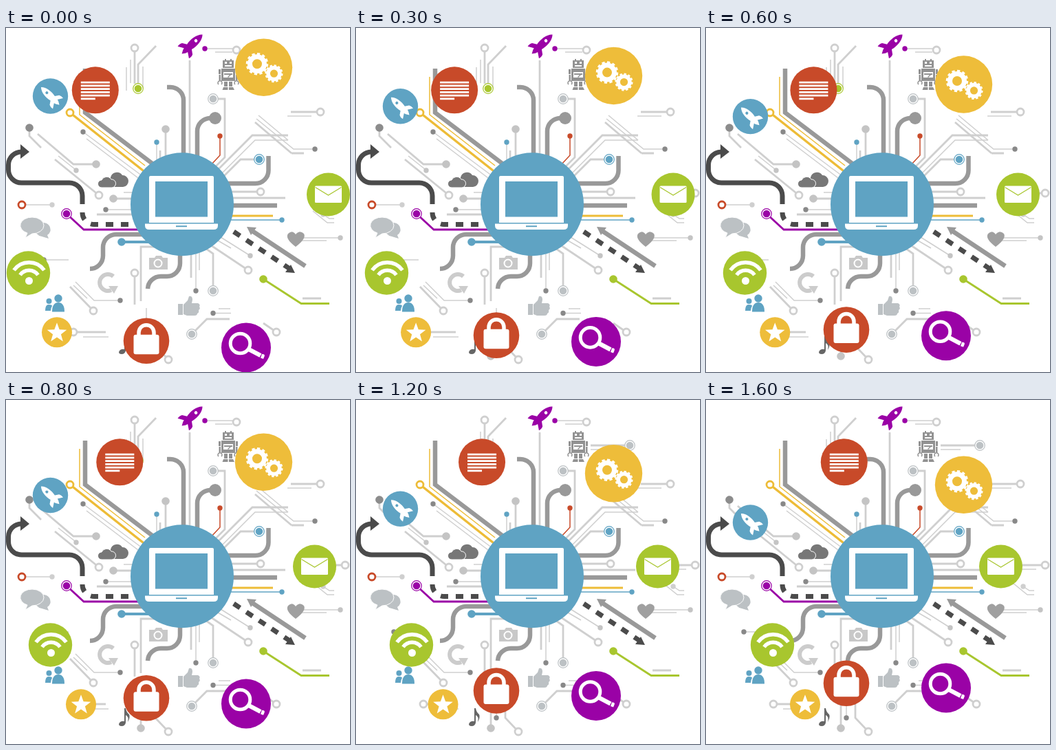
These frames come from a looping animation (500x500 px, 1700 ms). An HTML page:

```html
<!DOCTYPE html>
<html lang="en">
<head>
<meta charset="utf-8">
<title>Connected devices</title>
<style>
  html, body { margin: 0; width: 100%; height: 100%; overflow: hidden; background: #fff; }
  svg { display: block; width: 100vw; height: 100vh; }
  .line { fill: none; stroke: #fff; }
</style>
</head>
<body>
<svg viewBox="0 0 500 500">
  <defs>
    <path id="rocket" d="M0-24C6-18 7-7 5 2L11 6Q13 9 12 14L4 9 3 12 0 17-3 12-4 9-12 14Q-13 9-11 6L-5 2C-7-7-6-18 0-24Z"/>
    <g id="gear" class="line">
      <circle r="10.500" stroke-width="7"/>
      <circle r="14.500" stroke-width="3.500" pathLength="24" stroke-dasharray="1.100 .9"/>
    </g>
  </defs>

  <g id="wires" fill="none"></g>
  <g id="nodes"></g>
  <path d="M21 169L34 180L21 190ZM420 356L406 355L414 344Z" fill="#4b4b4b"/>
  <path d="M350 289L364 290L356 301Z" fill="#999"/>

  <!-- fixed icons -->
  <g transform="translate(268 26) rotate(47)">
    <use href="#rocket" fill="#9a02a6"/><circle cy="-11" r="2.300" fill="#fff"/>
  </g>
  <g fill="#929292">
    <path d="M315 47H318V45H320V47H326V45H328V47H331V58H315ZM313 59H333V77H313ZM309 60H312V67H309ZM334 60H337V67H334ZM309.500 68H312V76H309.500ZM334 68H336.500V76H334ZM317 78H322V85H317ZM324 78H329V85H324ZM316 86H322.500V90H314.500ZM324 86H330L332 90H324Z"/>
    <path d="M309 82A3 3 0 1 1 313 82M333 82A3 3 0 1 1 337 82" fill="none" stroke="#929292" stroke-width="1.500"/>
    <path d="M318 49H321V52H318ZM325 49H328V52H325ZM318 54H328V56H318ZM316 64H330V72H316Z" fill="#fff"/>
    <path d="M317 66H329V68H317ZM322 71L327 66L328 67L323 72Z"/>
  </g>
  <g fill="#777">
    <path d="M152 231V217A9.500 9.500 0 0 1 169 214A8.500 8.500 0 0 1 170 231Z"/>
    <path d="M139 232A5 5 0 0 1 139 221A8 8 0 0 1 153 220A6 6 0 0 1 154 232Z" stroke="#fff"/>
  </g>
  <g fill="#bcc1c4">
    <path d="M55 283A11 10 0 0 1 60 301L62 306L52 303A11 10 0 0 1 55 283Z"/>
    <path d="M38 275A17 12 0 1 1 38 299L28 305L31 298A17 12 0 0 1 38 275Z" stroke="#fff"/>
    <path d="M250 401H257V417H250ZM258 402L264 396L266 390Q271 389 271 395L270 400H279Q283 402 281 405Q283 408 280 410Q281 414 278 415Q278 418 274 418H263L258 416Z"/>
  </g>
  <path d="M156 361A12 12 0 1 0 153 381" fill="none" stroke="#ccc" stroke-width="6"/>
  <path d="M149 375H163L157 386Z" fill="#ccc"/>
  <path d="M208 334H216L218 331H226L228 334H235V351H208Z" fill="#c8c8c8"/>
  <circle cx="221" cy="342" r="5.500" class="line" stroke-width="2"/>
  <path d="M421 318Q405 306 410 299Q416 293 421 300Q427 293 433 299Q437 306 421 318Z" fill="#a0a0a0"/>
  <path d="M172 448H174Q175 454 179 457Q181 461 177 468Q179 460 174 458V469Q173 474 168 474Q164 474 164 471Q166 466 172 467Z" fill="#666"/>

  <!-- sliding badges: start position and total travel -->
  <g data-x="129.8" data-y="90.3" data-dx="71"><circle r="34" fill="#c84a29"/>
    <path id="text" class="line" stroke-width="2.600"/></g>
  <g data-x="64.5" data-y="99" data-dy="79"><circle r="25.700" fill="#5fa3c3"/>
    <g transform="translate(2 2) rotate(-46) scale(.9)">
      <use href="#rocket" fill="#fff"/><circle cy="-11" r="2.300" fill="#5fa3c3"/>
    </g></g>
  <g data-x="374.5" data-y="57.2" data-dy="66"><circle r="41.700" fill="#eebd3a"/>
    <use href="#gear" x="-9.500" y="-5"/>
    <use href="#gear" transform="translate(15 9) scale(.8)"/></g>
  <g data-x="468.5" data-y="242" data-dx="-40"><circle r="31.500" fill="#a8c62e"/>
    <rect x="-19.500" y="-12.500" width="39" height="24.500" rx="1.500" fill="#fff"/>
    <path d="M-19-10.500L0 1L19-10.500" fill="none" stroke="#a8c62e" stroke-width="1.200"/></g>
  <g data-x="32.5" data-y="356" data-dx="64"><circle r="31.700" fill="#a8c62e"/>
    <path class="line" stroke-width="5.500" d="M-21-4A27 27 0 0 1 23-4M-12 3A16 16 0 0 1 14 3"/>
    <circle cx="1" cy="11.500" r="5.500" fill="#fff"/></g>
  <g data-x="74" data-y="442.3" data-dx="70"><circle r="22" fill="#eebd3a"/>
    <path id="star" fill="#fff"/></g>
  <g data-x="204" data-y="454.7" data-dy="-43"><circle r="33.300" fill="#c84a29"/>
    <rect x="-18.500" y="-9" width="37" height="28.500" rx="3" fill="#fff"/>
    <path class="line" stroke-width="5.500" d="M-11-8V-12A11 11 0 0 1 11-12V-8"/></g>
  <g data-x="349" data-y="464.5" data-dy="-46"><circle r="36" fill="#9a02a6"/>
    <circle class="line" cx="-8.500" cy="-6" r="14.300" stroke-width="5"/>
    <path class="line" stroke-width="6.500" d="M3 2L21 11.500"/>
    <path d="M23 9.500Q28 9 26.500 13L25 16.500L21 15Z" fill="#fff"/></g>

  <!-- people, hub and laptop -->
  <g fill="#5fa3c3">
    <circle cx="62.500" cy="397" r="4"/><path d="M57 411Q57 402 62 402Q67 402 67 404Q65 407 65 411Z"/>
    <circle cx="76" cy="393" r="5.700"/><path d="M67 412.500Q67 399 76 399Q85 399 85 412.500Z"/>
    <circle cx="256" cy="256.300" r="75"/>
  </g>
  <g fill="#fff">
    <path fill-rule="evenodd" d="M210 215H300Q302 215 302 217V283H208V217Q208 215 210 215ZM217 223V274.500H293V223Z"/>
    <path d="M202 284.500H308V287Q308 293 302 293H208Q202 293 202 287Z"/>
    <path d="M247 287.200H263V289.200H247Z" fill="#5fa3c3"/>
  </g>
</svg>
<script>
const $ = id => document.getElementById(id);
const LIGHT = "#cfcfcf", SILVER = "#bcc1c4", GREY = "#999", DARK = "#4b4b4b", BLUE = "#5fa3c3",
      RED = "#c84a29", YELLOW = "#edbc37", GREEN = "#a8c62e", PURPLE = "#9a02a6";

function add(parent, tag, attrs) {
  const el = document.createElementNS("http://www.w3.org/2000/svg", tag);
  for (const name in attrs) el.setAttribute(name, attrs[name]);
  $(parent).append(el);
}

const circle = (cx, cy, r, fill, stroke = "none", width = 0) =>
  add("nodes", "circle", { cx, cy, r, fill, stroke, "stroke-width": width });
const node = {
  ring: (x, y, color) => circle(x, y, 5, "#fff", color, 2.8),
  dot: (x, y, color) => circle(x, y, 3.7, color),
  disc: (x, y, color) => circle(x, y, 5.8, color),
  knob: (x, y, color) => circle(x, y, 9, color),
  target(x, y, color) {
    circle(x, y, 7.3, "#fff", color, 1.2);
    circle(x, y, 5.3, color);
  },
};

// A wire may carry a node at its first point; wires run on beneath the hub.
function wire(d, width, color = LIGHT, kind, nodeColor = color, dash = "none") {
  add("wires", "path", { d, stroke: color, "stroke-width": width, "stroke-dasharray": dash });
  if (kind) node[kind](...d.match(/[\d.]+/g).slice(0, 2), nodeColor);
}
const thin = (d, kind, color = "#888") => wire(d, 1.5, LIGHT, kind, color);
const wide = (d, kind, color = LIGHT) => wire(d, 2.8, LIGHT, kind, color);
const pipe = (d, kind) => wire(d, 6.5, GREY, kind);

// Thin companions
thin("M181 46V80M175 57V91M199 56V88M76 186L100 205M117 161L192 218M171 239H256");
thin("M304 35H329M341 72H370M409 128H444M459 246H480M430 309H466M112 449H149M309 408H326");
thin("M410 163H362L312 213M367 127L410 163M446 266L467 283H477");
thin("M281 256V352M308 309L327 320M98 374L118 393");

// Thin wires
thin("M112 151L198 215", "dot");
thin("M145 264H256", "dot");
thin("M449 176H418L364 132", "dot");
thin("M355 331L312 304", "dot", "#c4c4c4");
thin("M276 382V256", "dot");
thin("M301 414.500H327", "dot");
thin("M166 396H128L101 369", "dot");
thin("M55 337H91", "dot");
thin("M204 462V407", "dot");
thin("M67 257H28", "dot", LIGHT);
thin("M102 207L100 205", "dot", "#c4c4c4");
thin("M461 271L470 277H477", "dot", LIGHT);
thin("M486 305H432", "dot", "#c4c4c4");
thin("M219 166V256", "dot", BLUE);
thin("M289 30H330", "dot", PURPLE);

// Wide wires
wide("M192 88V53L218 26", "target", GREEN);
wide("M267 47V256M224 178V256M256 247H406M256 271H132M269 256V363M256 318H196V397M431 393H458M410 156H358L306 208");
wide("M415 182H433M415 182L362 137");
wide("M34 145V157L51 174", "disc", "#8c8c8c");
wide("M131 198H98L46 154", "disc", "#c4c4c4");
wide("M232 147V256", "disc", "#c4c4c4");
wide("M156 248H256", "disc", "#c4c4c4");
wide("M196 477V440", "disc", "#c4c4c4");
wide("M301 103H318V188L300 206", "target", SILVER);
wide("M398 66H341", "target", SILVER);
wide("M301 382V328L284 316", "target", SILVER);
wide("M270 445L292 423H325", "target", SILVER);
wide("M368 191H341L308 224", "target", BLUE);
["187 29V81", "335 32H330", "457 122H414", "135 243L71 191", "370 238H256", "493 240H459", "352 352L298 316",
 "187 356V402", "127 411L93 376", "98 442H145", "236 482L217 462V440", "393 442L374 429"]
  .forEach(route => wide("M" + route, "ring"));

// Pipes
pipe("M115 59V123L214 198");
pipe("M234 86h5a19 19 0 0 1 19 19V256");
pipe("M304 131h-7a19 19 0 0 0-19 19V256", "knob");
pipe("M381.500 186v21a19 19 0 0 1-19 19H256");
pipe("M256 258H394");
pipe("M253 256v86a19 19 0 0 1-19 19h-9a19 19 0 0 0-19 18");
pipe("M256 300h-96a19 19 0 0 0-19 19v12a19 19 0 0 1-19 19");
pipe("M358 295L435 346");

// Coloured wires
wire("M93 123L204 211", 3.5, YELLOW, "ring");
wire("M256 273H388", 3, YELLOW);
wire("M107 71V126L202 200", 1.5, YELLOW);
wire("M88 270L113 293H256", 2.8, PURPLE, "target");
wire("M311 157V185L297 200", 1.5, RED, "dot");
wire("M401 279H256", 1.5, BLUE, "dot");
wire("M168 311H256", 4, BLUE, "disc");
wire("M374 365L429 400.500H470", 2.8, GREEN, "disc");
node.ring(23, 257, RED);

// Dark arrows
wire("M22.500 180a19 19 0 0 0-19 19v7a19 19 0 0 0 19 19H92a19 19 0 0 1 19 19v12", 7, DARK);
wire("M111 268a17 17 0 0 0 17 17.500H256", 7, DARK, null, null, "11 11");
wire("M331 296L414 351", 7, DARK, null, null, "11 11");

const rows = Array.from({ length: 6 }, (_, i) => `M-21 ${4.75 * i - 11.2}h${i < 5 ? 42 : 21}`);
$("text").setAttribute("d", rows.join(""));

const starPoints = Array.from({ length: 10 }, (_, i) => {
  const r = i % 2 ? 6.2 : 15, a = (i / 5 - 0.5) * Math.PI;
  return `${r * Math.cos(a)} ${r * Math.sin(a) + 1}`;
});
$("star").setAttribute("d", `M${starPoints.join("L")}Z`);

const STEP = 100, STEPS = 17;
const badges = document.querySelectorAll("[data-x]");

function draw(time) {
  const p = Math.floor(time / STEP) % STEPS / (STEPS - 1);
  for (const badge of badges) {
    const { x, y, dx = 0, dy = 0 } = badge.dataset;
    badge.setAttribute("transform", `translate(${+x + dx * p} ${+y + dy * p})`);
  }
}

const start = performance.now();
function loop() {
  draw(performance.now() - start);
  requestAnimationFrame(loop);
}
loop();
</script>
</body>
</html>
```
